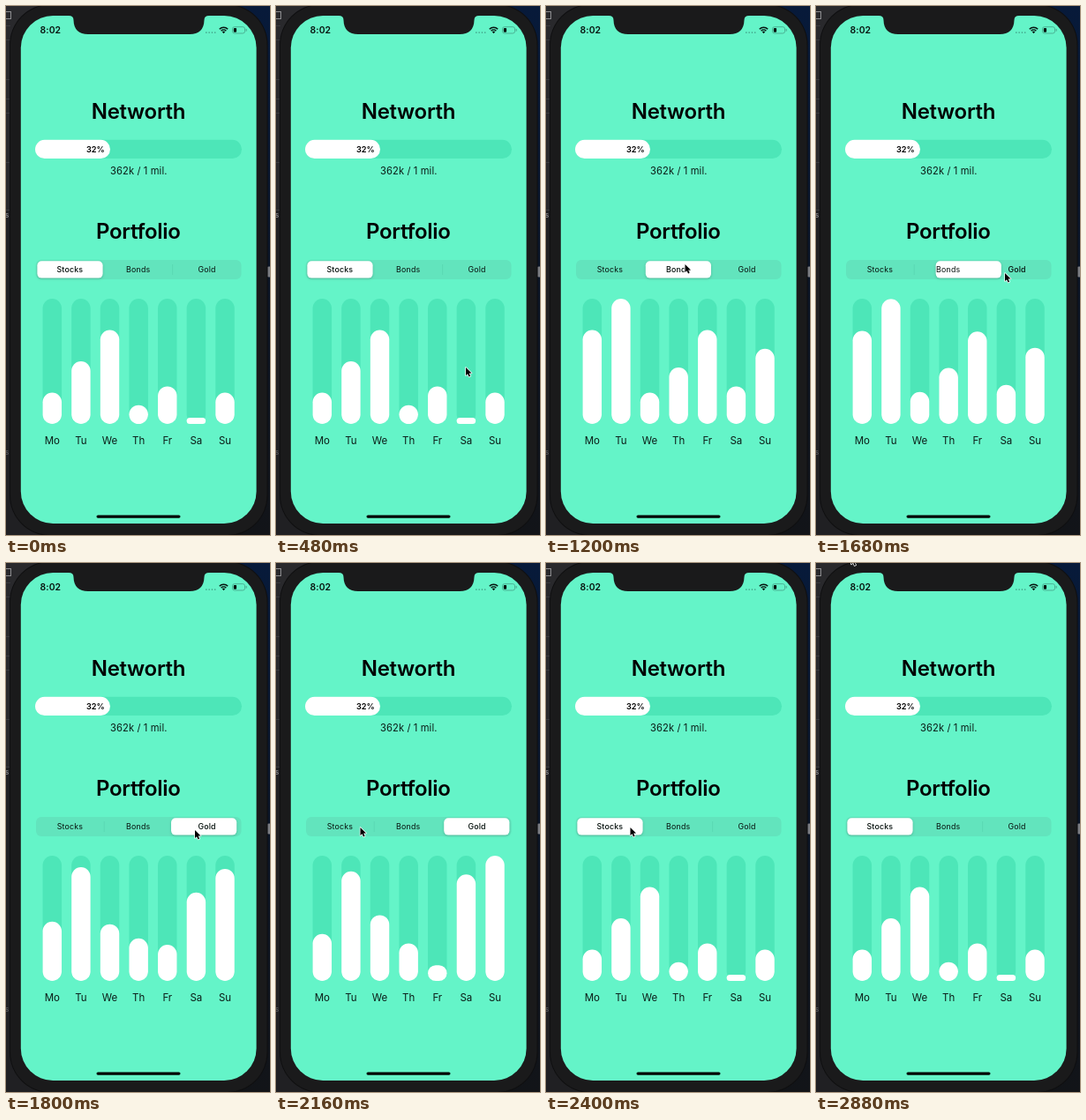
Animation, 299 px wide and 600 px high, one loop 3 s. Source, as an HTML page with a canvas:

```html
<!DOCTYPE html>
<html lang="en">
<head>
<meta charset="utf-8">
<title>Portfolio chart</title>
<style>
html, body { margin: 0; width: 100%; height: 100%; overflow: hidden; background: #1c1c1e; }
canvas { display: block; width: 299px; height: 600px; }
</style>
</head>
<body>
<canvas id="stage"></canvas>
<script>
const W = 299, H = 600, LOOP = 3000, STEP = 120;
const MINT = '#64f4c8', TRACK = '#4de6b8', BODY = '#1a1a1b';
const FONT = 'Inter, Roboto, sans-serif';

const canvas = document.getElementById('stage');
const ctx = canvas.getContext('2d');
const ratio = window.devicePixelRatio || 1;
canvas.width = W * ratio;
canvas.height = H * ratio;

const days = ['Mo', 'Tu', 'We', 'Th', 'Fr', 'Sa', 'Su'];
const tabs = [
  { name: 'Stocks', x: 72.3, values: [.25, .5, .75, .15, .3, .05, .25] },
  { name: 'Bonds', x: 149.6, values: [.75, 1, .25, .45, .75, .3, .6] },
  { name: 'Gold', x: 227.5, values: [.375, .875, .525, .3, .125, .85, 1] }
];

// Taps: press dims the label, then thumb and bars start moving
const taps = [
  { tab: 1, press: 960, thumb: 962, bars: 974 },
  { tab: 2, press: 1550, thumb: 1636, bars: 1658 },
  { tab: 0, press: 2161, thumb: 2162, bars: 2174 }
];
const MOVE = 220;

// Pointer waypoints: time, x, y
const path = [
  [120, 71, 116], [240, 140, 325], [360, 205, 468], [480, 215, 410],
  [600, 142, 300], [720, 146, 292], [960, 146, 292], [1080, 151, 292],
  [1200, 157.5, 293], [1320, 170, 296], [1440, 195, 300], [1560, 212, 303],
  [1680, 214, 303], [1880, 214, 303], [2040, 140, 301], [2160, 95.5, 300],
  [2400, 95.5, 300], [2520, 84, 190], [2640, 50, 12], [2760, 42, 0],
  [2880, 40, -7.5], [3000, 40, -7.5]
];

const mix = (a, b, p) => a + (b - a) * p;
const clamp = v => Math.min(1, Math.max(0, v));

function bezier(x1, y1, x2, y2) {
  const at = (a, b, s) => 3 * a * s * (1 - s) ** 2 + 3 * b * s * s * (1 - s) + s ** 3;
  return x => {
    if (x <= 0 || x >= 1) return clamp(x);
    let lo = 0, hi = 1;
    for (let i = 0; i < 24; i++) {
      const mid = (lo + hi) / 2;
      if (at(x1, x2, mid) < x) lo = mid; else hi = mid;
    }
    return at(y1, y2, lo);
  };
}
const ease = bezier(.25, .1, .25, 1);
const easeInOut = bezier(.42, 0, .58, 1);

function box(x, y, w, h, r, fill) {
  ctx.beginPath();
  ctx.roundRect(x, y, w, h, Math.min(r, w / 2, h / 2));
  ctx.fillStyle = fill;
  ctx.fill();
}

function text(str, x, y, size, weight, fill = '#000', spacing = 0) {
  ctx.font = `${weight} ${size}px ${FONT}`;
  ctx.letterSpacing = spacing + 'px';
  ctx.textAlign = 'center';
  ctx.fillStyle = fill;
  ctx.fillText(str, x + spacing / 2, y);
  ctx.letterSpacing = '0px';
}

function drawDesk() {
  ctx.fillStyle = '#29292c';
  ctx.fillRect(0, 0, 150, H);
  ctx.fillStyle = '#202023';
  ctx.fillRect(0, 232, 150, 368);
  const sky = ctx.createLinearGradient(0, 0, 0, H);
  sky.addColorStop(0, '#071a3a');
  sky.addColorStop(.5, '#0b1526');
  sky.addColorStop(1, '#121418');
  ctx.fillStyle = sky;
  ctx.fillRect(150, 0, 149, H);
  ctx.fillStyle = '#3b3b3f';
  for (const y of [22, 38, 83, 105, 121, 177, 231]) ctx.fillRect(0, y, 5, 1);
  ctx.strokeStyle = '#8d8d90';
  ctx.lineWidth = 1;
  ctx.strokeRect(-3.5, 6.5, 9, 8);
  text('s', 1, 240, 8, 400, '#a8a8ab');
  text('s', 1, 509, 8, 400, '#66666a');
  box(294, 295.5, 8, 12, 4, '#7c7e84');
}

function drawPhone() {
  box(4, -2, 292.5, 603, 46, '#0f0f10');
  box(5, -1, 290.5, 601, 45, BODY);
  box(16.8, 11, 266.8, 576, 36.5, MINT);

  // Notch with flared upper corners
  ctx.beginPath();
  ctx.moveTo(71, 10);
  ctx.lineTo(71, 11);
  ctx.quadraticCurveTo(76.5, 11, 76.5, 16);
  ctx.quadraticCurveTo(77, 32, 93, 32);
  ctx.lineTo(208, 32);
  ctx.quadraticCurveTo(224, 32, 224.5, 16);
  ctx.quadraticCurveTo(224.5, 11, 230, 11);
  ctx.lineTo(230, 10);
  ctx.fillStyle = BODY;
  ctx.fill();

  box(102.5, 577.5, 95, 3.2, 1.6, '#000');
}

function drawStatus() {
  text('8:02', 50.3, 31.2, 10.4, 600, '#07120e', .1);
  for (let i = 0; i < 4; i++) box(226 + i * 3.3, 29.2, 1.7, 1.7, 1, '#45a88d');

  ctx.strokeStyle = '#071510';
  ctx.lineWidth = 1.5;
  for (const r of [4, 6.7]) {
    ctx.beginPath();
    ctx.arc(246.5, 31, r, Math.PI * 1.25, Math.PI * 1.75);
    ctx.stroke();
  }
  ctx.beginPath();
  ctx.moveTo(246.5, 31.2);
  ctx.arc(246.5, 31, 2.4, Math.PI * 1.25, Math.PI * 1.75);
  ctx.fillStyle = '#071510';
  ctx.fill();

  ctx.beginPath();
  ctx.roundRect(256.5, 23.7, 14, 7.3, 2.2);
  ctx.strokeStyle = '#4bb294';
  ctx.lineWidth = 1;
  ctx.stroke();
  box(257.8, 25, 3.3, 4.7, 1, '#071510');
  box(271.6, 25.8, 1.2, 3, .6, '#4bb294');
}

function drawWorth() {
  text('Networth', 150.1, 128.4, 24, 600, '#000', -.3);
  box(33, 151.8, 234, 21.2, 10.6, TRACK);
  box(33, 151.8, 85, 21.2, 10.6, '#fff');
  text('32%', 101.4, 166.2, 9.2, 600);
  text('362k / 1 mil.', 150.2, 190.5, 11.2, 400, '#0b1d17', .1);
  text('Portfolio', 149.9, 264.4, 24, 600, '#000', -.3);
}

function stateAt(t) {
  const s = { selected: 0, thumb: 0, pressed: -1, values: tabs[0].values };
  for (const tap of taps) {
    if (t >= tap.press && t < tap.thumb) s.pressed = tap.tab;
    if (t < tap.thumb) continue;
    s.selected = tap.tab;
    s.thumb = mix(s.thumb, tap.tab, ease(clamp((t - tap.thumb) / MOVE)));
    const p = easeInOut(clamp((t - tap.bars) / MOVE));
    s.values = s.values.map((v, i) => mix(v, tabs[tap.tab].values[i], p));
  }
  return s;
}

function drawTabs(s) {
  box(34, 288, 232.5, 22, 6, '#62e4bd');
  ctx.fillStyle = '#58d6b1';
  [110.8, 188.3].forEach((x, i) => {
    if (s.selected !== i && s.selected !== i + 1) ctx.fillRect(x, 293, .8, 12);
  });
  ctx.save();
  ctx.shadowColor = 'rgba(0,0,0,.2)';
  ctx.shadowBlur = 3 * ratio;
  ctx.shadowOffsetY = ratio;
  box(35.4 + s.thumb * 77.4, 289.2, 74.2, 19.4, 5, '#fff');
  ctx.restore();
  tabs.forEach((tab, i) => {
    const fill = s.pressed === i ? 'rgba(0,0,0,.52)' : '#07120e';
    text(tab.name, tab.x, 302.2, 8.9, s.selected === i ? 500 : 400, fill, .15);
  });
}

function drawBars(values) {
  days.forEach((day, i) => {
    const x = 52.3 + i * 32.62, h = values[i] * 142;
    box(x - 10.75, 332, 21.5, 142, 10.75, TRACK);
    box(x - 10.75, 474 - h, 21.5, h, 10.75, '#fff');
    text(day, x, 497, 11.5, 400, '#0b1d17');
  });
}

function drawPointer(t) {
  const i = path.findIndex(k => k[0] > t);
  if (i < 1) return;
  const a = path[i - 1], b = path[i], p = (t - a[0]) / (b[0] - a[0]);
  ctx.save();
  ctx.translate(mix(a[1], b[1], p), mix(a[2], b[2], p));
  ctx.scale(.84, .84);
  ctx.beginPath();
  ctx.moveTo(0, 0);
  ctx.lineTo(0, 10.8);
  ctx.lineTo(2.5, 8.5);
  ctx.lineTo(4.2, 12.5);
  ctx.lineTo(6.1, 11.7);
  ctx.lineTo(4.4, 7.8);
  ctx.lineTo(7.8, 7.7);
  ctx.closePath();
  ctx.lineJoin = 'round';
  ctx.lineWidth = 1.7;
  ctx.strokeStyle = '#fff';
  ctx.stroke();
  ctx.fillStyle = '#000';
  ctx.fill();
  ctx.restore();
}

function draw(now) {
  // Motion is held for each step, like a screen recording
  const t = Math.floor((now % LOOP) / STEP) * STEP;
  const state = stateAt(t);
  ctx.setTransform(ratio, 0, 0, ratio, 0, 0);
  drawDesk();
  drawPhone();
  drawStatus();
  drawWorth();
  drawTabs(state);
  drawBars(state.values);
  drawPointer(t);
}

const start = performance.now();
function tick() {
  draw(performance.now() - start);
  requestAnimationFrame(tick);
}
tick();
</script>
</body>
</html>
```
